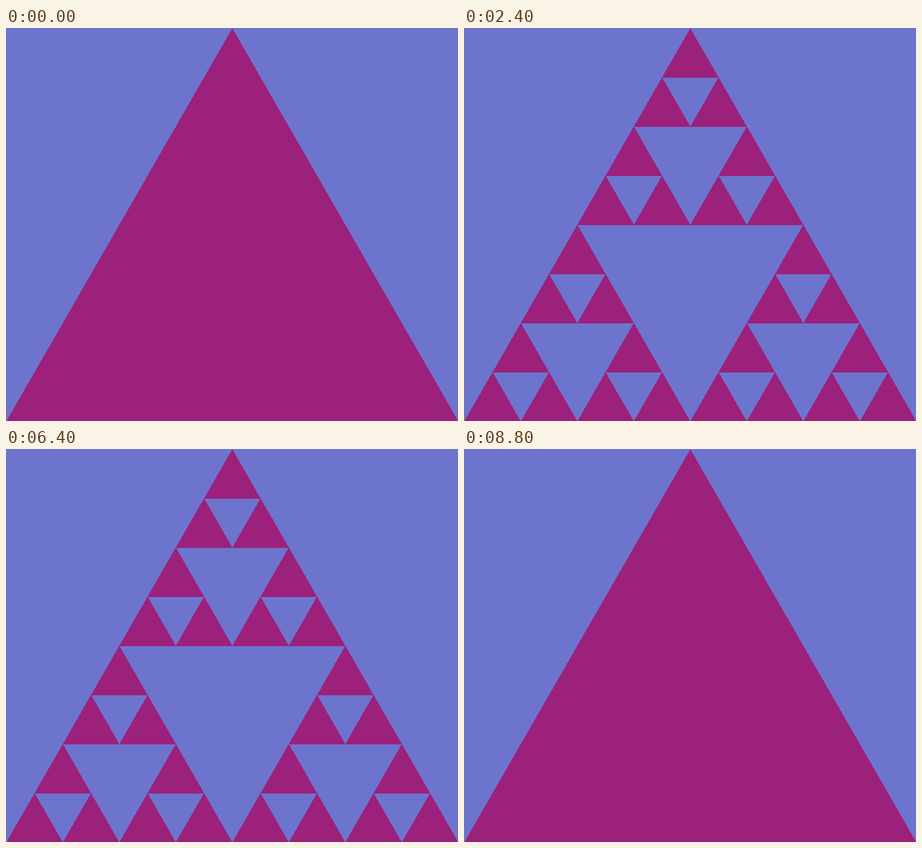
An HTML page for the animation above (9600 ms loop, 690 by 600 pixels).

```html
<!DOCTYPE html>
<html lang="en">
<head>
<meta charset="utf-8">
<title>Sierpinski triangle</title>
<style>
  html, body { margin: 0; width: 100%; height: 100%; overflow: hidden; background: #6d74ce; }
  svg { display: block; }
  path { fill: #9c217b; shape-rendering: crispEdges; }
</style>
</head>
<body>
<svg width="690" height="600" viewBox="0 0 690 600"><path id="gasket"/></svg>
<script>
const WIDTH = 690, HEIGHT = 600;
const STEP_MS = 800;
const DEPTHS = [0, 1, 2, 3, 4, 5, 5, 4, 3, 2, 1, 0];
const OUTSET = 0.1; // keeps pixel centres lying exactly on an edge inside

function triangle(x, y, w, h) {
  const left = x - w / 2 - OUTSET, right = x + w / 2 + OUTSET;
  const bottom = y + h + OUTSET;
  return `M${x} ${y - 2 * OUTSET}L${right} ${bottom}L${left} ${bottom}Z`;
}

function sierpinski(depth, x, y, w, h) {
  if (depth === 0) return triangle(x, y, w, h);
  const corners = [[x, y], [x - w / 4, y + h / 2], [x + w / 4, y + h / 2]];
  return corners.map(([cx, cy]) => sierpinski(depth - 1, cx, cy, w / 2, h / 2)).join("");
}

const shapes = Array.from({ length: 6 }, (_, depth) =>
  sierpinski(depth, WIDTH / 2 + 0.5, 0.5, WIDTH, HEIGHT));
const gasket = document.getElementById("gasket");
let shown = -1;

function draw() {
  const step = Math.floor(performance.now() / STEP_MS) % DEPTHS.length;
  const depth = DEPTHS[step];
  if (depth !== shown) {
    gasket.setAttribute("d", shapes[depth]);
    shown = depth;
  }
  requestAnimationFrame(draw);
}
draw();
</script>
</body>
</html>
```
